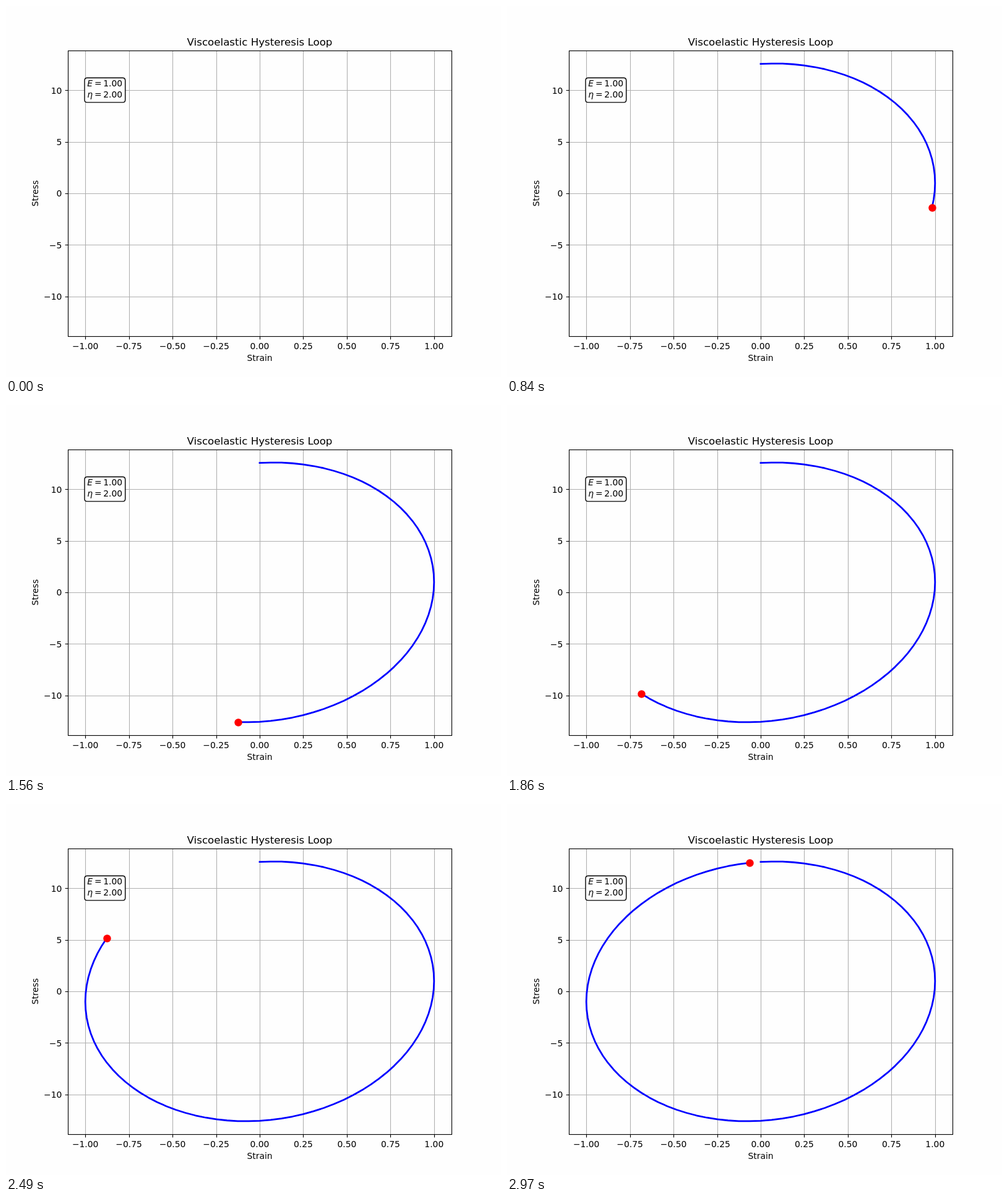
An HTML page for the animation above (3000 ms loop, 800 by 600 pixels).

```html
<!DOCTYPE html>
<html lang="en">
<head>
<meta charset="utf-8">
<title>Viscoelastic Hysteresis Loop</title>
<style>
  html, body { margin: 0; width: 100%; height: 100%; overflow: hidden; background: #fefefe; }
  svg { display: block; width: 800px; height: 600px; }
  text { font: 13.889px "DejaVu Sans", sans-serif; fill: #000; white-space: pre; }
  .title { font-size: 16.667px; }
  .mid { text-anchor: middle; }
  .end { text-anchor: end; }
  .var { font-style: oblique; }
  .grid { stroke: #b0b0b0; stroke-width: 1.11; }
  .axis { stroke: #000; stroke-width: 1.11; fill: none; }
  .box { stroke: #000; stroke-width: 1.39; fill: #fefefe; }
  #curve { stroke: #00f; stroke-width: 2.78; stroke-linecap: square; stroke-linejoin: round; fill: none; }
  #dot { fill: #f00; }
</style>
</head>
<body>
<svg id="stage" viewBox="0 0 800 600" xmlns="http://www.w3.org/2000/svg">
  <g id="back"></g>
  <path id="curve"/>
  <circle id="dot" r="6.25"/>
  <rect class="axis" x="100.5" y="72.5" width="620" height="462"/>
  <g id="front"></g>
</svg>
<script>
const E = 1, ETA = 2, STEPS = 100, STEP_MS = 30;
const OMEGA = 2 * Math.PI;
const PEAK = Math.hypot(E, ETA * OMEGA);
const px = strain => 410 + strain * 310 / 1.1;
const py = stress => 303 - stress * 231 / (1.1 * PEAK);
const snap = v => Math.floor(v + 0.5) + 0.5;

const byId = id => document.getElementById(id);
const back = byId("back"), front = byId("front");
const curve = byId("curve"), dot = byId("dot");

function add(parent, tag, attrs, content = "") {
  const el = document.createElementNS("http://www.w3.org/2000/svg", tag);
  for (const key in attrs) el.setAttribute(key, attrs[key]);
  el.textContent = content;
  parent.append(el);
}
const line = (cls, x1, y1, x2, y2) => add(back, "line", { class: cls, x1, y1, x2, y2 });
const label = (content, x, y, cls = "", extra = {}) =>
  add(front, "text", { x, y, class: cls, ...extra }, content);
const minus = s => s.replace("-", "\u2212");

// Grid, ticks and tick labels
for (let i = -4; i <= 4; i++) {
  const x = px(i / 4), sx = snap(x);
  line("grid", sx, 72.5, sx, 534.5);
  line("axis", sx, 534.5, sx, 539.36);
  label(minus((i / 4).toFixed(2)), x, 555, "mid");
}
for (let v = -10; v <= 10; v += 5) {
  const y = py(v), sy = snap(y);
  line("grid", 100.5, sy, 720.5, sy);
  line("axis", 95.64, sy, 100.5, sy);
  label(minus(String(v)), 90.3, Math.round(y + 5.3), "end");
}

label("Viscoelastic Hysteresis Loop", 410, 64, "title mid");
label("Strain", 410, 574, "mid");
label("Stress", 0, 0, "mid", { transform: "translate(52 303) rotate(-90)" });

// Parameter box
add(front, "path", {
  class: "box",
  d: "M131.2 116.2H188.6Q192.7 116.2 192.7 120.4V151.7Q192.7 155.9 188.6 155.9" +
     "H131.2Q127 155.9 127 151.7V120.4Q127 116.2 131.2 116.2Z"
});
[["E", E, 130], ["\u03b7", ETA, 148]].forEach(([name, value, y]) => {
  label(name, 131.3, y, "var");
  label("=", 142.9, y);
  label(value.toFixed(2), 157.2, y);
});

// Stress follows E * strain + eta * strain rate
const points = Array.from({ length: STEPS }, (_, i) => {
  const a = OMEGA * i / STEPS;
  return [px(Math.sin(a)), py(E * Math.sin(a) + ETA * OMEGA * Math.cos(a))];
});

let shown = -1;
function draw() {
  const step = Math.floor(performance.now() / STEP_MS + 1e-6) % STEPS;
  if (step !== shown) {
    shown = step;
    const visible = step > 0 ? "visible" : "hidden";
    curve.setAttribute("visibility", visible);
    dot.setAttribute("visibility", visible);
    const path = points.slice(0, step + 1).map(p => p.map(v => v.toFixed(2)).join(" "));
    curve.setAttribute("d", "M" + path.join("L"));
    dot.setAttribute("cx", snap(points[step][0]));
    dot.setAttribute("cy", snap(points[step][1]));
  }
  requestAnimationFrame(draw);
}
draw();
</script>
</body>
</html>
```
